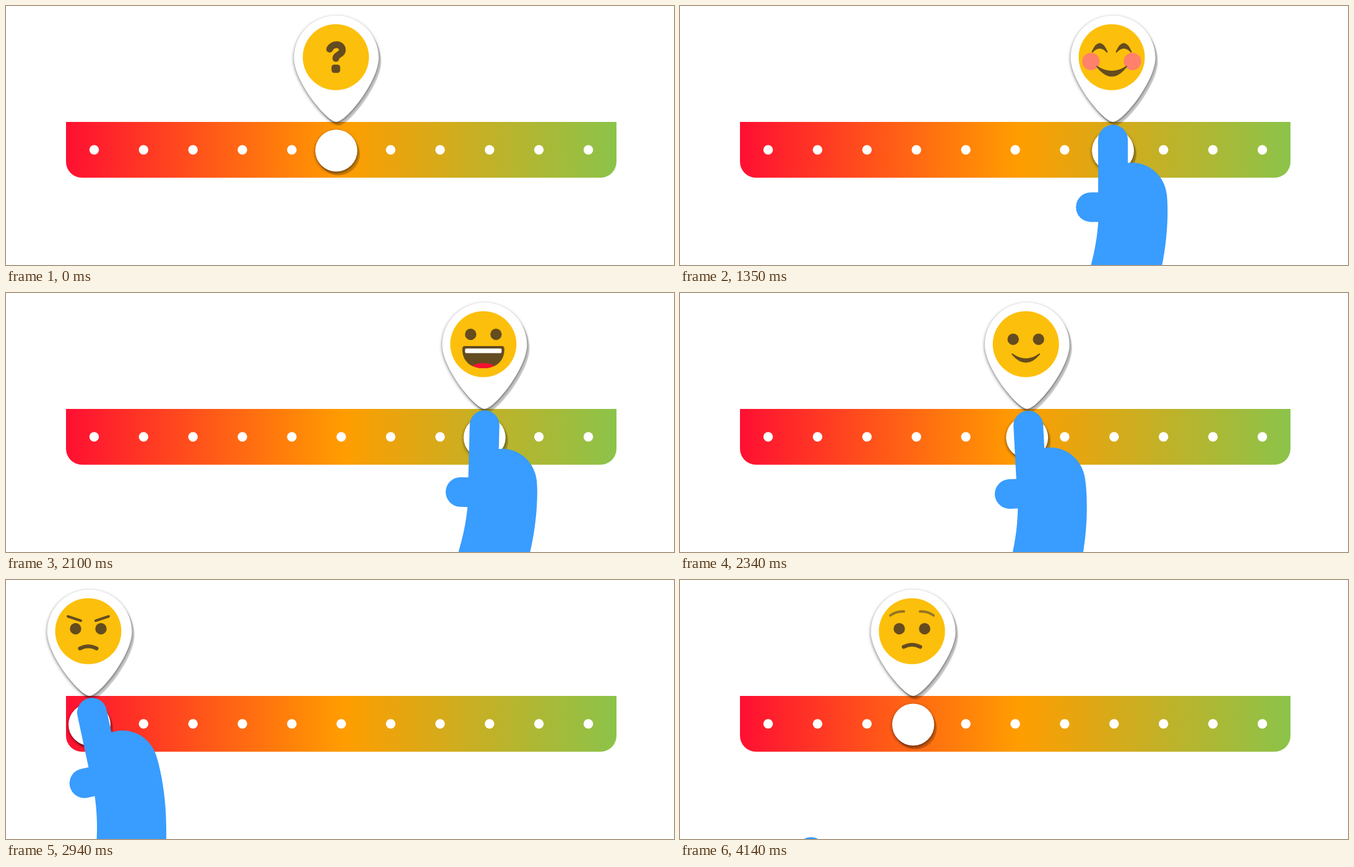
Recreate the animation shown at these times as an HTML page with a canvas. Size 1080 by 420 pixels, loop 4560 ms.

```html
<!DOCTYPE html>
<html lang="en">
<head>
<meta charset="utf-8">
<title>Mood slider</title>
<style>
  html, body { margin: 0; width: 100%; height: 100%; overflow: hidden; background: #fff; }
  canvas { display: block; width: 1080px; height: 420px; }
</style>
</head>
<body>
<canvas id="stage"></canvas>
<script>
const LOOP = 4560, STEP = 30;
const BROWN = '#644c20', YELLOW = '#fcbf0b', BLUE = '#399cff';
const canvas = document.getElementById('stage');
const ctx = canvas.getContext('2d');
const dpr = window.devicePixelRatio || 1;
canvas.width = 1080 * dpr;
canvas.height = 420 * dpr;

// Keyframes as [time, value], eased in and out between neighbours
const pinKeys = [[1050, 534], [1650, 866], [1860, 866], [2940, 135], [3120, 135], [3570, 377]];
const handDx = [[420, -116], [870, 2], [1350, 0], [2100, 0], [2580, 4], [2940, 4], [3450, .5], [3780, .5], [4140, -165]];
const handY = [[420, 422], [870, 195], [1860, 190], [2580, 191], [2940, 191], [3450, 195], [3780, 195], [4140, 417]];
const handTilt = [[780, 5.2], [1800, -3.5], [1860, -3.5], [2940, 12.1]];

function track(keys, t) {
  if (t <= keys[0][0]) return keys[0][1];
  for (let i = 1; i < keys.length; i++) {
    const [t0, a] = keys[i - 1], [t1, b] = keys[i];
    if (t < t1) {
      const p = (t - t0) / (t1 - t0);
      return a + (b - a) * p * p * (3 - 2 * p);
    }
  }
  return keys[keys.length - 1][1];
}

const pinPath = new Path2D('M-68.5 84A68.5 68.5 0 0 1 68.5 84C68.5 122 16 188 0 188C-16 188-68.5 122-68.5 84Z');
const knobPath = new Path2D('M-34 234.5A34 34 0 0 1 34 234.5A34 34 0 0 1-34 234.5Z');
// Origin is the centre of the fingertip
const handPath = new Path2D(
  'M-24 0A24 24 0 0 1 24 0V38L30 37.5C60 37.5 84 60 87 90' +
  'C90 121 87 166 79 204C72 240 62 280 50 320H-64C-54 280-44 240-36 204' +
  'C-30 181-26 161-24 133.5H-36A24 24 0 0 1-36 85.5H-24Z');

function fill(path, color) {
  ctx.fillStyle = color;
  ctx.fill(path);
}

function stroke(d, width, color = BROWN) {
  ctx.strokeStyle = color;
  ctx.lineWidth = width;
  ctx.lineCap = ctx.lineJoin = 'round';
  ctx.stroke(new Path2D(d));
}

function disc(x, y, r, color) {
  ctx.beginPath();
  ctx.arc(x, y, r, 0, Math.PI * 2);
  ctx.fillStyle = color;
  ctx.fill();
}

function box(x, y, w, h, r, color) {
  ctx.beginPath();
  ctx.roundRect(x, y, w, h, r);
  ctx.fillStyle = color;
  ctx.fill();
}

function raised(path, dx, dy) {
  ctx.save();
  ctx.translate(dx, dy);
  fill(path, 'rgba(0,0,0,.19)');
  ctx.restore();
  ctx.save();
  ctx.shadowColor = 'rgba(0,0,0,.55)';
  ctx.shadowBlur = 5 * dpr;
  ctx.shadowOffsetY = 2 * dpr;
  fill(path, '#fff');
  ctx.restore();
}

// Face parts, measured from the centre of the face
function crescent(x, y, w, outer, inner) {
  const d = `M${x - w} ${y}Q${x} ${y + outer * 2} ${x + w} ${y}Q${x} ${y + inner * 2} ${x - w} ${y}Z`;
  fill(new Path2D(d), BROWN);
  stroke(d, 2);
}

function eyes(y) {
  disc(-20.5, y, 9.2, BROWN);
  disc(20.5, y, 9.2, BROWN);
}

function happyEyes() {
  crescent(-19.5, -8.5, 12, -13.5, -6.5);
  crescent(19.5, -8.5, 12, -13.5, -6.5);
}

function frown(y) {
  stroke(`M-13.5 ${y}Q0 ${y - 7} 13.5 ${y}`, 6);
}

function openMouth() {
  const mouth = new Path2D('M-30 3H30Q34 3 34 8C34 29 19 39 0 39S-34 29-34 8Q-34 3-30 3Z');
  fill(mouth, BROWN);
  box(-29.5, 7, 59, 7.5, 2, '#fff');
  ctx.save();
  ctx.clip(mouth);
  ctx.beginPath();
  ctx.ellipse(0, 37, 18, 6.5, 0, 0, Math.PI * 2);
  ctx.fillStyle = '#f5122f';
  ctx.fill();
  ctx.restore();
}

function rollingEye(x) {
  ctx.save();
  ctx.clip(new Path2D(`M${x - 24} -11Q${x} -21 ${x + 24} -13V24H${x - 24}Z`));
  disc(x, -5, 19.7, '#fff');
  disc(x + 7.2, -12, 8, BROWN);
  ctx.restore();
}

const faces = {
  unknown() {
    ctx.translate(1.3, 0);
    stroke('M-10-13C-6-23 10.5-23 10.5-11.5C10.5-3.5 0-5 0 2', 11);
    box(-7, 12, 14, 13.5, 4.5, BROWN);
  },
  angry() {
    eyes(-4);
    stroke('M-33-24L-12-17M33-24L12-17', 4);
    frown(28);
  },
  sad() {
    eyes(-6);
    frown(27);
  },
  rolling() {
    rollingEye(-24);
    rollingEye(24);
    frown(31);
  },
  worried() {
    stroke('M-35-25.5Q-25-33-13-32M35-25.5Q25-33 13-32', 4, '#957721');
    eyes(-4);
    frown(25.5);
  },
  neutral() {
    eyes(-8);
    stroke('M-16 22H16', 6);
  },
  content() {
    eyes(-8);
    crescent(0, 16, 22, 13, 8);
  },
  blushing() {
    disc(-33.5, 7, 14, '#ff806b');
    disc(33.5, 7, 14, '#ff806b');
    happyEyes();
    crescent(0, 15, 24, 15.5, 8);
  },
  grinning() {
    eyes(-16);
    openMouth();
  },
  delighted() {
    happyEyes();
    openMouth();
  }
};
const scale = ['angry', 'sad', 'rolling', 'worried', 'neutral', 'unknown',
  'content', 'blushing', 'grinning', 'delighted', 'delighted'];

function drawBar() {
  const g = ctx.createLinearGradient(97, 0, 987, 0);
  g.addColorStop(0, '#ff0f32');
  g.addColorStop(.505, '#ff9d00');
  g.addColorStop(1, '#8bc34a');
  box(97, 188, 890, 90.5, [0, 0, 26, 26], g);
  for (let i = 0; i <= 10; i++) disc(142.5 + i * 79.9, 233.3, 7.7, '#fff');
}

function drawPin(x, face) {
  ctx.save();
  ctx.translate(x, 0);
  raised(knobPath, 4, 6);
  raised(pinPath, 4, 6);
  ctx.translate(-2, 83);
  if (face === 'unknown') ctx.translate(0, 0);
  disc(face === 'unknown' ? 1.3 : 0, 0, 53.5, YELLOW);
  faces[face]();
  ctx.restore();
}

function drawHand(x, y, tilt) {
  ctx.save();
  ctx.translate(x, y + 24);
  ctx.rotate(-tilt * Math.PI / 180);
  fill(handPath, BLUE);
  ctx.restore();
}

function draw(t) {
  const x = track(pinKeys, t);
  // The face follows the pin one step late
  const mood = Math.round((track(pinKeys, t - STEP) - 142.5) / 79.9);
  ctx.setTransform(dpr, 0, 0, dpr, 0, 0);
  ctx.fillStyle = '#fff';
  ctx.fillRect(0, 0, 1080, 420);
  drawBar();
  drawPin(x, scale[mood]);
  drawHand(x + track(handDx, t), track(handY, t), track(handTilt, t));
}

const start = performance.now();
function tick() {
  const t = (performance.now() - start) % LOOP;
  draw(Math.floor(t / STEP) * STEP);
  requestAnimationFrame(tick);
}
tick();
</script>
</body>
</html>
```
